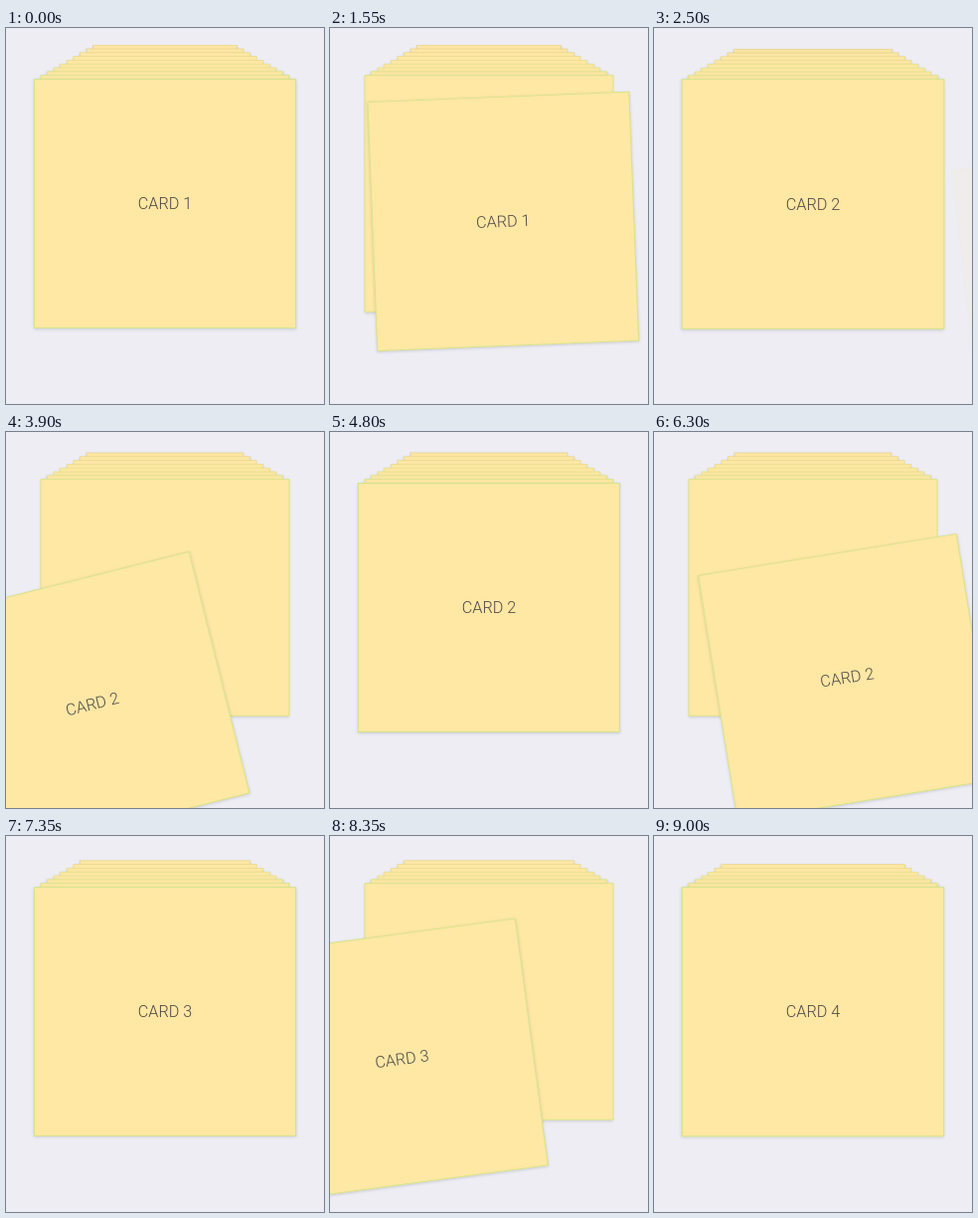
An HTML page for the animation above (9050 ms loop, 320x378 px).

```html
<!DOCTYPE html>
<html lang="en">
<head>
<meta charset="utf-8">
<title>Card stack</title>
<style>
  html, body { margin: 0; width: 100%; height: 100%; overflow: hidden; background: #eeedf4; }
  #stage { position: relative; width: 320px; height: 378px; overflow: hidden; }
  .card {
    position: absolute; left: 28px; top: 51px; width: 264px; height: 251px;
    box-sizing: border-box; border: 1px solid; background: #ffe7a4;
    box-shadow: 0 1px 3px rgba(70, 80, 90, .22);
    font: 300 16.2px/250px Roboto, Inter, sans-serif; color: #4c4b48; text-align: center;
  }
</style>
</head>
<body>
<div id="stage"></div>
<script>
const LOOP = 9050, STEP = 50, COUNT = 10;
const REST = 180;   // pause of the finger before it lets go
const FADE = 275;

// x, y: where the finger lets go; side: way the card flies off, 0 springs back
const drags = [
  { card: 0, start: 1300, end: 2250, x: 60, y: 75, side: 1 },
  { card: 1, start: 3350, end: 4230, x: -82, y: 109, side: 0 },
  { card: 1, start: 5100, end: 6830, x: 39, y: 80, side: 1 },
  { card: 2, start: 7950, end: 8700, x: -110, y: 60, side: -1 }
];
const throws = drags.filter(d => d.side);

const stage = document.getElementById('stage');
const cards = Array.from({ length: COUNT }, (_, i) => {
  const el = document.createElement('div');
  el.className = 'card';
  el.textContent = 'CARD ' + (i + 1);
  el.style.zIndex = COUNT - i;
  return stage.appendChild(el);
});

const clamp = v => Math.max(0, Math.min(1, v));
const ease = u => (1 - Math.cos(Math.PI * clamp(u))) / 2;
const spring = ms => ms <= 0 ? 0 : 1 - Math.exp(-ms / 85) * Math.cos(Math.PI * ms / 230);

function offset(card, t) {
  const d = drags.findLast(d => d.card === card && t > d.start);
  if (!d) return [0, 0];
  const after = Math.max(0, t - d.end);
  const pull = ease((t - d.start) / (d.end - REST - d.start)) * (d.side ? 1 : 1 - spring(after));
  return [d.x * pull + d.side * .9 * after, d.y * pull];
}

function draw(t) {
  cards.forEach((el, i) => {
    const level = throws.slice(0, i).reduce((l, d) => l - spring(t - d.end), i);
    const [x, y] = offset(i, t);
    const angle = .0124 * x - .136 * y;
    el.style.opacity = throws[i] ? clamp(1 - (t - throws[i].end) / FADE) : 1;
    el.style.borderColor = `hsl(${71 - 3 * level}, 62%, 72%)`;
    el.style.transform =
      `translate(${x}px, ${y - 10.05 * level}px) rotate(${angle}deg) scale(${1 - .05 * level})`;
  });
}

const begin = performance.now();
function tick() {
  const t = (performance.now() - begin) % LOOP;
  draw(t - t % STEP);
  requestAnimationFrame(tick);
}
tick();
</script>
</body>
</html>
```
